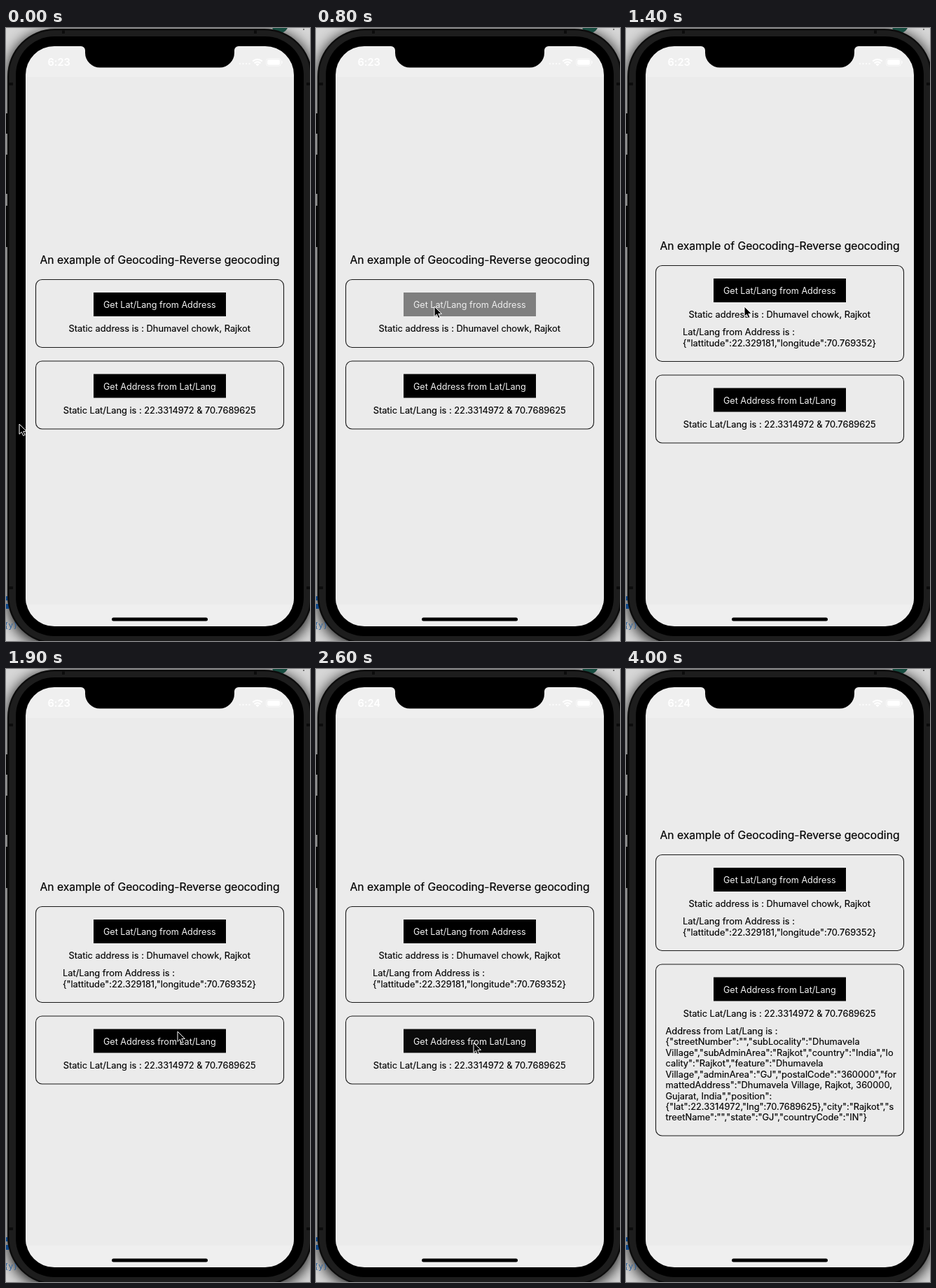
Animation of 434x876 px, one loop 5.6 s. Source, as an HTML page:

```html
<!DOCTYPE html>
<html lang="en">
<head>
<meta charset="utf-8">
<title>Geocoding demo</title>
<style>
  html, body { margin: 0; width: 100%; height: 100%; overflow: hidden; background: #b8b8b8; }
  svg { display: block; width: 100%; height: 100%; }
  text { font-family: Inter, "Liberation Sans", sans-serif; font-feature-settings: "calt" 0; white-space: pre; }
  .title { font-size: 15.7px; text-anchor: middle; stroke: #000; stroke-width: .2px; }
  .body { font-size: 12.85px; stroke: #000; stroke-width: .15px; }
  .mid { text-anchor: middle; }
  .label { font-size: 12.6px; fill: #f2f2f2; text-anchor: middle; }
  .clock { font-size: 14.6px; font-weight: 600; fill: #fff; }
  .code { font: 11px "Noto Sans Mono", monospace; fill: #245c9c; }
</style>
</head>
<body>
<svg viewBox="0 0 434 876" preserveAspectRatio="none">
  <defs>
    <filter id="soft" x="-10%" y="-10%" width="120%" height="120%"><feGaussianBlur stdDeviation="9"/></filter>
    <clipPath id="glass"><rect x="28" y="26" width="383" height="829" rx="41"/></clipPath>
  </defs>

  <!-- desktop behind the device -->
  <rect width="434" height="876" fill="#d6d6d6"/>
  <rect x="2" y="4" width="435" height="880" rx="62" filter="url(#soft)" opacity=".8"/>
  <circle cx="391" cy="-5" r="12" fill="#174c40"/>
  <circle cx="425" cy="2" r="1" fill="#555"/>
  <path d="M0 812h4v6h-4zM0 823h4v7h-4z" fill="#0d4688"/>
  <text class="code" x="-3" y="857">{y}</text>

  <!-- device -->
  <path d="M0 122h4v29H0zM0 181h4v56H0zM0 254h4v59H0z" fill="#060606"/>
  <rect x="2" y="1" width="435" height="879" rx="68" fill="#0c0c0c"/>
  <rect x="4.5" y="3.5" width="430" height="874" rx="65" fill="#1d1d1d"/>
  <path d="M3 80h7M3 800h7M429 80h5M429 800h5M82 2v6M356 2v6" stroke="#0c0c0c" stroke-width="4"/>
  <rect x="14" y="12" width="411" height="857" rx="55"/>

  <!-- screen -->
  <g clip-path="url(#glass)">
    <rect x="28" y="26" width="383" height="829" fill="#efefef"/>
    <rect x="28" y="70" width="383" height="754" fill="#ebebeb"/>
    <path d="M107 26a6 6 0 0 1 6 6v3.5a21 21 0 0 0 21 21h171a21 21 0 0 0 21-21v-3.5a6 6 0 0 1 6-6z"/>
    <text class="clock" id="clock" x="59.5" y="54"></text>
    <g fill="#fff">
      <g opacity=".7">
        <circle cx="334" cy="51" r="1.3"/><circle cx="338.5" cy="51" r="1.3"/>
        <circle cx="343" cy="51" r="1.3"/><circle cx="347.5" cy="51" r="1.3"/>
      </g>
      <path d="M359 54.5l-2.6-2.7q2.6-2 5.2 0z"/>
      <path d="M352.2 47.6q6.8-5.6 13.6 0M354.6 50.2q4.4-3.6 8.8 0" fill="none" stroke="#fff" stroke-width="2"/>
      <rect x="371.5" y="43.8" width="21" height="10.4" rx="3" fill="none" stroke="#fff" stroke-opacity=".55"/>
      <rect x="373" y="45.3" width="18" height="7.4" rx="1.8"/>
      <rect x="393.4" y="47" width="1.5" height="4" rx=".7" opacity=".6"/>
    </g>
    <rect x="151" y="842.5" width="137" height="5" rx="2.5"/>
    <text class="title" id="title" x="219.5"></text>
    <g id="cards"></g>
  </g>

  <path id="cursor" d="M0 0V14.4L3.3 11.3L5.6 16.6L8.1 15.5L5.8 10.4H10.4Z" stroke="#fff" stroke-width="1"/>
</svg>

<script>
const LOOP = 5600, STEP = 100;
const $ = id => document.getElementById(id);

function add(parent, tag, attrs, text) {
  const el = document.createElementNS('http://www.w3.org/2000/svg', tag);
  for (const k in attrs) el.setAttribute(k, attrs[k]);
  if (text) el.textContent = text;
  return parent.appendChild(el);
}

// A card with a button, a fixed line and a result that appears later.
function makeCard(label, note, left, lines, fullHeight) {
  const root = add($('cards'), 'g', {});
  const frame = add(root, 'rect', { x: 42.5, y: .5, width: 354, rx: 9, fill: 'none', stroke: '#181818', 'stroke-width': 1.1 });
  const button = add(root, 'g', {});
  add(button, 'rect', { x: 125, y: 19, width: 189, height: 34 });
  add(button, 'text', { class: 'label', x: 219.3, y: 41 }, label);
  add(root, 'text', { class: 'body mid', x: 219.2, y: 75.3 }, note);
  const result = add(root, 'g', {});
  lines.forEach((line, i) => add(result, 'text', { class: 'body', x: left, y: 100.3 + i * 15.45 }, line));
  return { root, frame, button, result, fullHeight };
}

function showCard(card, y, height, opacity) {
  card.root.setAttribute('transform', `translate(0 ${y})`);
  card.frame.setAttribute('height', height - 1);
  card.button.setAttribute('opacity', opacity);
  card.result.setAttribute('visibility', height > 98 ? 'visible' : 'hidden');
}

const first = makeCard('Get Lat/Lang from Address', 'Static address is : Dhumavel chowk, Rajkot', 81, [
  'Lat/Lang from Address is :',
  '{"lattitude":22.329181,"longitude":70.769352}'
], 138);
const second = makeCard('Get Address from Lat/Lang', 'Static Lat/Lang is : 22.3314972 & 70.7689625', 56.5, [
  'Address from Lat/Lang is :',
  '{"streetNumber":"","subLocality":"Dhumavela',
  'Village","subAdminArea":"Rajkot","country":"India","lo',
  'cality":"Rajkot","feature":"Dhumavela',
  'Village","adminArea":"GJ","postalCode":"360000","for',
  'mattedAddress":"Dhumavela Village, Rajkot, 360000,',
  'Gujarat, India","position":',
  '{"lat":22.3314972,"lng":70.7689625},"city":"Rajkot","s',
  'treetName":"","state":"GJ","countryCode":"IN"}'
], 246);
$('title').textContent = 'An example of Geocoding-Reverse geocoding';

const clamp = v => Math.min(1, Math.max(0, v));
const inOut = v => v < .5 ? 2 * v * v : 1 - 2 * (1 - v) ** 2;

// Opacity of a tapped button: down to .2 in 150 ms, back in 250 ms.
function tap(t, down, up) {
  const dim = at => 1 - .8 * inOut(clamp((at - down) / 150));
  if (t < up) return dim(t);
  const low = dim(up);
  return low + (1 - low) * inOut(clamp((t - up) / 250));
}

// time, x, y
const path = [[0, 19, 566], [500, 169, 398], [1400, 169, 398], [1900, 245, 518], [2200, 225, 534], [LOOP, 225, 534]];

function cursorAt(t) {
  const i = path.findIndex(p => p[0] > t);
  const [t0, x0, y0] = path[i - 1], [t1, x1, y1] = path[i];
  const k = inOut((t - t0) / (t1 - t0));
  return [x0 + (x1 - x0) * k, y0 + (y1 - y0) * k];
}

function draw(now) {
  const t = Math.floor((now % LOOP) / STEP) * STEP;
  const h1 = t < 1400 ? 98 : first.fullHeight;
  const h2 = t < 3000 ? 98 : second.fullHeight;
  const y = 457 - (h1 + h2) / 2;
  $('title').setAttribute('y', y - 22.5);
  showCard(first, y, h1, tap(t, 710, 810));
  showCard(second, y + h1 + 18.5, h2, tap(t, 2250, 2395));
  $('clock').textContent = t < 2100 ? '6:23' : '6:24';
  $('cursor').setAttribute('transform', `translate(${cursorAt(t).join(' ')})`);
  $('cursor').setAttribute('visibility', t < 3500 ? 'visible' : 'hidden');
}

const start = performance.now();
function tick() {
  draw(performance.now() - start);
  requestAnimationFrame(tick);
}
tick();
</script>
</body>
</html>
```
